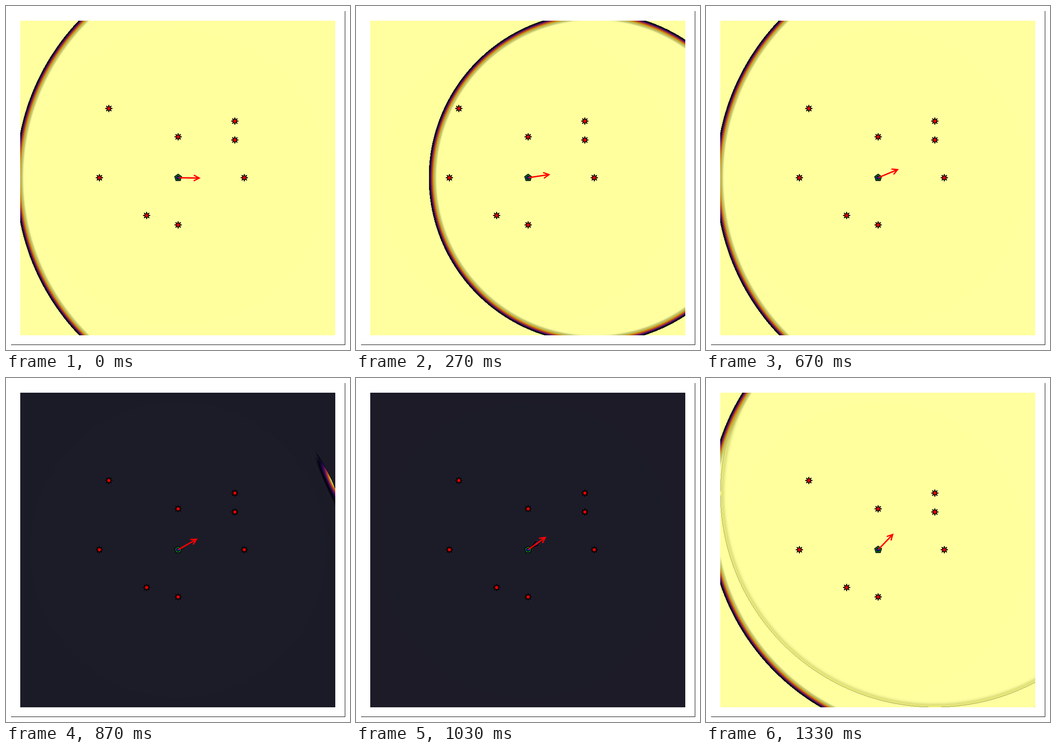
A matplotlib script that plays this animation: 748x749 px, repeating every 1360 ms.

```python
import numpy as np
import matplotlib.pyplot as plt
from matplotlib.animation import FuncAnimation
from matplotlib.patches import Polygon, Circle

W, H, DPI = 748, 749, 128
PX = 72 / DPI                      # one pixel in points
LEFT, TOP, SIDE = 31, 32, 685
CX, CY, HALF = 374.3, 373.9, 342.5

STEPS, TICKS, TICK_MS = 41, 136, 10
PERIOD = 10                        # steps between two pings
SPEED, START = 68.5, 24            # wave front in pixels
BEAM, WINDOW = 3.6, 12.5           # beam spread in degrees
TAIL = 7                           # length of the wave's tail
ECHO = 0.075

# Reflectors, in units of half the field, y up
TARGETS = [(0.42, 0), (0.36, 0.36), (0.36, 0.24), (0, 0.26),
           (-0.44, 0.44), (-0.5, 0), (-0.2, -0.24), (0, -0.3)]

RAMP = plt.get_cmap("inferno")(np.linspace(0, 1, 256))[:, :3] * 255
GLOSS_LOW = np.array([28, 28, 37])
GLOSS_HIGH = np.array([3, 0, -6])

cols = np.arange(SIDE) + 0.5
GX, GY = np.meshgrid(LEFT + cols - CX, CY - TOP - cols)
RANGE = np.hypot(GX, GY)
BEARING = np.degrees(np.arctan2(GY, GX))
TARGET_RANGE = [np.hypot(GX - x * HALF, GY - y * HALF) for x, y in TARGETS]


def heading(step):
    return 1.18 * step - 0.9


def beam(bearing, aim):
    off = (bearing - aim + 180) % 360 - 180
    return np.where(np.abs(off) < WINDOW, np.exp(-off**2 / (2 * BEAM**2)), 0)


def wave(dist, front):
    """Sharp front with a soft tail behind it."""
    lag = front - dist
    return np.where(lag >= 0, np.exp(-(lag / TAIL)**2), 0)


def field(step):
    age = (step - 1) % PERIOD
    aim = heading(step - age)
    front = START + SPEED * age
    u = beam(BEARING, aim) * wave(RANGE, front)
    for (x, y), dist in zip(TARGETS, TARGET_RANGE):
        gain = float(beam(np.degrees(np.arctan2(y, x)), aim))
        radius = front - HALF * np.hypot(x, y)
        if gain > 0 and radius > 0:
            u -= ECHO * gain * wave(dist, radius)
    return u


def shade(u):
    """Autoscaled colours; level areas are glossy, slopes are dull."""
    low, span = u.min(), np.ptp(u)
    v = (u - low) / span if span > 0 else np.ones_like(u)
    dy, dx = np.gradient(v)
    flat = np.exp(-(dx**2 + dy**2) / 0.0065**2)[..., None]
    base = RAMP[(v * 255).round().astype(int)]
    v = v[..., None]
    gloss = GLOSS_LOW * (1 - v) + GLOSS_HIGH * v
    gloss = gloss * np.where(RANGE < 322, 1, 0.97)[..., None]
    rgb = base * (0.8 + 0.2 * flat) + gloss * flat
    return np.clip(rgb, 0, 255).round().astype(np.uint8)


def ring_points(x, y, n, radii):
    """Closed outline with n corners, the first one pointing up."""
    a = np.arange(n) * 2 * np.pi / n
    r = np.resize(radii, n)
    return np.column_stack([x + r * np.sin(a), y - r * np.cos(a)])


def arrow_points(step):
    a = np.radians(heading(step))
    along = np.array([np.cos(a), -np.sin(a)])
    side = np.array([np.sin(a), np.cos(a)])
    origin = np.array([CX, CY])
    tip = origin + 45.8 * along
    back = tip - 11 * along
    return (np.array([origin + 1.5 * along, tip]),
            np.array([back + 5.8 * side, tip, back - 5.8 * side]))


pictures = [shade(field(k)) for k in range(STEPS)]

fig = plt.figure(figsize=(W / DPI, H / DPI), dpi=DPI, facecolor="white")
ax = fig.add_axes([0, 0, 1, 1])
picture = ax.imshow(pictures[0], interpolation="nearest", aspect="auto",
                    extent=(LEFT, LEFT + SIDE, TOP + SIDE, TOP))
ax.set_xlim(0, W)
ax.set_ylim(H, 0)
ax.axis("off")

ax.plot([11, 737.2, 737.2], [737.6, 737.6, 11], color="black", lw=PX,
        snap=False, solid_joinstyle="miter", solid_capstyle="butt")

for tx, ty in TARGETS:
    star = ring_points(CX + tx * HALF, CY - ty * HALF, 16, [7.9, 3.3])
    ax.add_patch(Polygon(star, fc="red", ec="black", lw=1.4 * PX,
                         joinstyle="miter", zorder=3))

ax.add_patch(Polygon(ring_points(CX, CY, 5, [8]), fc="#0f6e1e", ec="black",
                     lw=1.4 * PX, joinstyle="miter", zorder=4))
ax.add_patch(Circle((CX, CY), 3.1, fc="#2a1cff", ec="black",
                    lw=1.6 * PX, zorder=5))

shaft, = ax.plot([], [], color="red", lw=3 * PX, zorder=6,
                 solid_capstyle="butt")
head, = ax.plot([], [], color="red", lw=2.8 * PX, zorder=6,
                solid_capstyle="round", solid_joinstyle="miter")


def update(tick):
    step = int(0.3 * tick + 0.15)   # thirty steps a second on a 10 ms clock
    picture.set_data(pictures[step])
    for line, pts in zip((shaft, head), arrow_points(step)):
        line.set_data(pts[:, 0], pts[:, 1])
    return picture, shaft, head


anim = FuncAnimation(fig, update, frames=TICKS, interval=TICK_MS,
                     repeat=True, repeat_delay=0)
plt.show()
```
